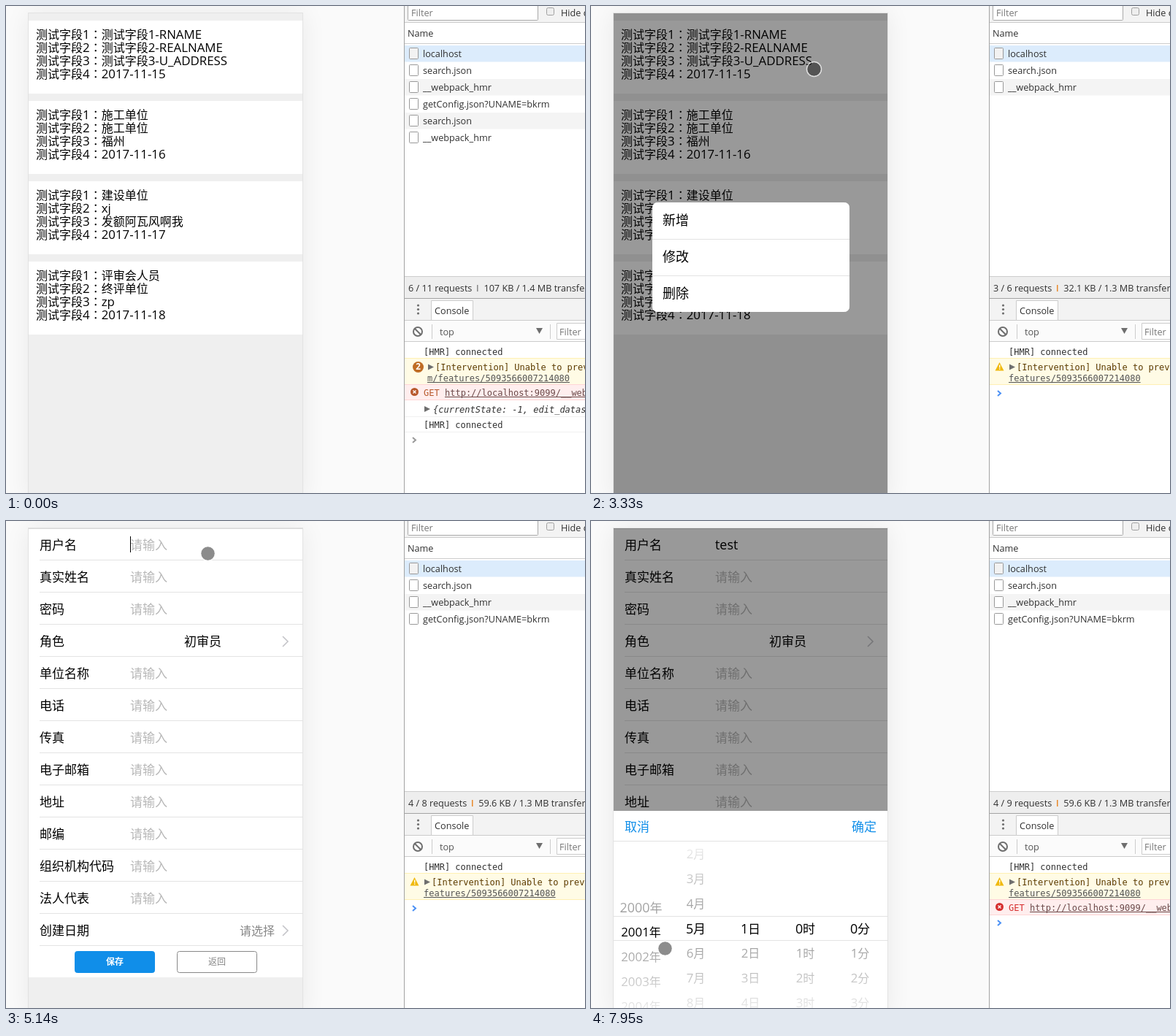
These frames come from a looping animation (793x667 px, 8000 ms). An HTML page with a canvas:

```html
<!DOCTYPE html>
<html lang="zh">
<head>
<meta charset="utf-8">
<style>
  html, body { margin: 0; width: 100%; height: 100%; overflow: hidden; background: #fafafa; }
  canvas { display: block; }
</style>
</head>
<body>
<canvas id="stage" width="793" height="667"></canvas>
<script>
const LOOP = 8000;
const PHONE = { x: 31, y: 10, w: 375, h: 667 };
const BLUE = '#108ee9', LINE = '#e3e3e3', INK = '#303030';
const ctx = document.getElementById('stage').getContext('2d');

const CARDS = [
  ['测试字段1-RNAME', '测试字段2-REALNAME', '测试字段3-U_ADDRESS', '2017-11-15'],
  ['施工单位', '施工单位', '福州', '2017-11-16'],
  ['建设单位', 'xj', '发额阿瓦风啊我', '2017-11-17'],
  ['评审会人员', '终评单位', 'zp', '2017-11-18'],
];
const FIELDS = ['用户名', '真实姓名', '密码', '角色', '单位名称', '电话', '传真', '电子邮箱',
  '地址', '邮编', '组织机构代码', '法人代表', '创建日期'];
const REQUESTS = ['localhost', 'search.json', '__webpack_hmr', 'getConfig.json?UNAME=bkrm',
  'search.json', '__webpack_hmr'];
// time, x, y
const POINTER = [
  [1760, 394, 150], [2220, 305, 86], [3540, 305, 86], [3850, 258, 295], [4000, 258, 295],
  [4330, 262, 228], [4760, 266, 110], [5080, 276, 44], [5460, 276, 44], [6230, 250, 564],
  [6560, 250, 564], [7200, 158, 640], [7240, 158, 640], [7480, 158, 560], [7630, 158, 560],
  [7800, 101, 614], [7950, 101, 585],
];
const MONTH_SCROLL = [[7240, 0], [7480, 2.6], [7560, 3.5], [7700, 4]];
const YEAR_SCROLL = [[7800, 0], [7950, 0.85]];

const progress = (t, from, to) => Math.min(1, Math.max(0, (t - from) / (to - from)));
const easeOut = p => 1 - (1 - p) ** 3;
// Latest value of a [time, value] list
const stepAt = (t, steps) => steps.filter(s => s[0] <= t).pop()[1];

function along(t, keys) {
  const i = keys.findIndex(k => k[0] > t);
  if (i === 0) return keys[0].slice(1);
  if (i < 0) return keys[keys.length - 1].slice(1);
  const p = progress(t, keys[i - 1][0], keys[i][0]);
  return keys[i - 1].slice(1).map((v, n) => v + (keys[i][n + 1] - v) * p);
}

function rect(x, y, w, h, color) {
  ctx.fillStyle = color;
  ctx.fillRect(x, y, w, h);
}

function box(x, y, w, h, fill, stroke, radius = 0) {
  ctx.beginPath();
  ctx.roundRect(x + 0.5, y + 0.5, w - 1, h - 1, radius);
  ctx.fillStyle = fill;
  ctx.fill();
  ctx.lineWidth = 1;
  ctx.strokeStyle = stroke || fill;
  ctx.stroke();
}

function disc(x, y, r, color) {
  ctx.beginPath();
  ctx.arc(x, y, r, 0, 7);
  ctx.fillStyle = color;
  ctx.fill();
}

function poly(points, color) {
  ctx.beginPath();
  points.forEach(p => ctx.lineTo(...p));
  ctx.fillStyle = color;
  ctx.fill();
}

function stroke(points, color, width = 1.5) {
  ctx.beginPath();
  points.forEach(p => ctx.lineTo(...p));
  ctx.strokeStyle = color;
  ctx.lineWidth = width;
  ctx.stroke();
}

function runFont(run, size, bold) {
  if (run === '：') return `300 ${size}px "Noto Sans CJK JP", "Noto Sans CJK", sans-serif`;
  if (/[ -~]/.test(run)) return `${bold ? 700 : 400} ${size * 1.055}px "Open Sans", sans-serif`;
  return `${bold ? 700 : 300} ${size}px "Noto Sans CJK SC", "Noto Sans CJK", sans-serif`;
}

// Mixed Chinese and Latin text, centred vertically on y; returns its right end
function text(s, x, y, size = 16, color = '#000', align = 0, bold = false) {
  const runs = s.match(/[\u4e00-\u9fff]+|：|[ -~]+/g).map(run => {
    const font = runFont(run, size, bold);
    ctx.font = font;
    return { run, font, width: ctx.measureText(run).width };
  });
  x -= align * runs.reduce((sum, r) => sum + r.width, 0);
  ctx.fillStyle = color;
  for (const { run, font, width } of runs) {
    ctx.font = font;
    ctx.fillText(run, x, y + size * 0.36);
    x += width;
  }
  return x;
}

const label = (s, x, y, color = INK) => text(s, x, y, 12, color);

function mono(s, x, y, color = INK, { italic, underline } = {}) {
  ctx.font = `${italic ? 'italic ' : ''}12px "DejaVu Sans Mono", monospace`;
  ctx.fillStyle = color;
  ctx.fillText(s, x, y + 4);
  if (underline) rect(x, y + 5, ctx.measureText(s).width, 1, color);
}

// ---- Phone ----

function drawList() {
  CARDS.forEach((values, i) => {
    const y = 20 + i * 110;
    rect(31, y, 375, 100, '#fff');
    values.forEach((v, n) => text(`测试字段${n + 1}：${v}`, 41, y + 19.5 + n * 18));
  });
}

function chevron(x, y) {
  stroke([[x - 4, y - 7], [x + 3, y], [x - 4, y + 7]], '#c4c4c8', 1.6);
}

function drawForm(t) {
  const typed = stepAt(t, [[0, ''], [5230, 'te'], [5310, 'tes'], [5460, 'test']]);
  const rowColor = stepAt(t, [[0, '#fff'], [6310, '#ececec'], [6460, '#fbfbfb'], [6560, '#fff']]);
  rect(31, 10, 375, 615, '#fff');
  rect(31, 10, 375, 1, '#d9d9d9');
  rect(31, 538, 375, 44, rowColor);
  FIELDS.forEach((name, i) => {
    const y = 33 + i * 44;
    text(name, 46, y, 17);
    rect(46, y + 20, 360, 1, LINE);
    if (i === 3) {
      text('初审员', 244, y, 17);
      chevron(383, y);
    } else if (i === 12) {
      text('请选择', 320, y, 16, '#888');
      chevron(383, y);
    } else if (i || !typed) {
      text('请输入', 170, y, 17, '#b8b8b8');
    }
  });
  const end = typed ? text(typed, 170, 33, 17) : 170;
  if (t >= 5060 && t < 6310 && (t - 5060) % 1000 < 500) rect(Math.round(end), 21, 1, 22, '#000');
  if (typed && t < 6560) {
    disc(380, 32.5, 10.5, '#ccc');
    stroke([[375.5, 28], [384.5, 37]], '#fff');
    stroke([[384.5, 28], [375.5, 37]], '#fff');
  }
  box(94, 589, 110, 30, BLUE, BLUE, 3);
  text('保存', 149, 604, 12, '#fff', 0.5, true);
  box(234, 589, 110, 30, '#fff', '#888', 3);
  text('返回', 289, 604, 12, '#888', 0.5);
}

function shade(alpha) {
  rect(31, 10, 375, 667, `rgba(0,0,0,${alpha})`);
}

function drawMenu(t) {
  if (t < 3180 || t > 4380) return;
  shade(0.4 * progress(t, 3110, 3330) * (1 - progress(t, 4070, 4380)));
  ctx.save();
  ctx.globalAlpha = progress(t, 3110, 3330) * (1 - progress(t, 4070, 4230));
  box(84, 269, 270, 150, '#fff', '#fff', 6);
  ['新增', '修改', '删除'].forEach((s, i) => {
    text(s, 98, 294 + i * 50, 18);
    if (i) rect(84, 269 + i * 50, 270, 1, LINE);
  });
  ctx.restore();
}

function drawWheel(column, unit, first, offset, selected) {
  for (let i = 0; i < 12; i++) {
    const y = 558.5 + (i - offset) * 34;
    if (y > 420 && y < 690) {
      text(first + i + unit, 68.5 + column * 75, y, i === selected ? 17 : 16, '#000', 0.5);
    }
  }
}

function drawMask(y, from, to) {
  const g = ctx.createLinearGradient(0, y, 0, y + 102);
  g.addColorStop(0, `rgba(255,255,255,${from})`);
  g.addColorStop(1, `rgba(255,255,255,${to})`);
  rect(31, y, 375, 102, g);
}

function drawPicker(t) {
  if (t < 6560) return;
  const p = easeOut(progress(t, 6530, 6860));
  shade(0.4 * p);
  ctx.save();
  ctx.translate(0, 280 * (1 - p));
  rect(31, 397, 375, 280, '#fff');
  ctx.beginPath();
  ctx.rect(31, 439, 375, 238);
  ctx.save();
  ctx.clip();
  drawWheel(0, '年', 2000, along(t, YEAR_SCROLL)[0], 0);
  drawWheel(1, '月', 1, along(t, MONTH_SCROLL)[0], t < 7700 ? 0 : 4);
  drawWheel(2, '日', 1, 0, 0);
  drawWheel(3, '时', 0, 0, 0);
  drawWheel(4, '分', 0, 0, 0);
  drawMask(439, 0.95, 0.6);
  drawMask(575, 0.6, 0.95);
  ctx.restore();
  for (const y of [438, 541, 574]) rect(31, y, 375, 1, LINE);
  text('取消', 46, 419, 17, BLUE);
  text('确定', 391, 419, 17, BLUE, 1);
  ctx.restore();
}

function drawPhone(t) {
  const { x, y, w, h } = PHONE;
  ctx.save();
  ctx.shadowColor = 'rgba(0,0,0,.07)';
  ctx.shadowBlur = 32;
  rect(x - 1, y - 1, w + 2, h + 2, '#e2e2e2');
  ctx.restore();
  ctx.save();
  ctx.beginPath();
  ctx.rect(x, y, w, h);
  ctx.clip();
  rect(x, y, w, h, '#efefef');
  const slide = Math.round(w * easeOut(progress(t, 4272, 4732)));
  if (slide < w && !(t >= 1010 && t < 1400)) {
    ctx.save();
    ctx.translate(-slide, 0);
    drawList();
    ctx.restore();
  }
  if (slide > 0) {
    ctx.save();
    ctx.translate(w - slide, 0);
    drawForm(t);
    ctx.restore();
  }
  drawMenu(t);
  drawPicker(t);
  ctx.restore();
}

function drawPointer(t) {
  if (t < 1760) return;
  const [x, y] = along(t, POINTER);
  disc(x + 0.5, y + 0.5, 9.5, 'rgba(0,0,0,.45)');
  ctx.beginPath();
  ctx.arc(x + 0.5, y + 0.5, 10, 0, 7);
  ctx.lineWidth = 1.5;
  ctx.strokeStyle = 'rgba(255,255,255,.7)';
  ctx.stroke();
}

// ---- Developer tools ----

function drawNetwork(t) {
  rect(546, 0, 247, 22, '#f3f3f3');
  rect(546, 22, 247, 1, '#ccc');
  box(550, -4, 179, 24, '#fff', '#a9a9a9', 1);
  label('Filter', 555, 9.5, '#777');
  box(740, 2, 11, 11, '#eee', '#a0a0a0', 2);
  label('Hide data URLs', 760, 9.5);
  if (t < 680 || t >= 760) label('Name', 550, 38);
  rect(546, 51, 247, 1, '#ccc');

  const rows = stepAt(t, [[0, 6], [680, 0], [760, 1], [1400, 2], [1550, 3], [4250, 4]]);
  REQUESTS.slice(0, rows).forEach((name, i) => {
    const y = 54 + i * 23;
    rect(546, y, 247, 22.5, i === 0 ? '#dcecfc' : i % 2 ? '#fff' : '#f4f4f4');
    box(552, y + 3, 13, 16, i === 0 ? '#f2f2f2' : '#fff', '#999', 1);
    label(name, 571, y + 11.5);
  });

  rect(546, 370, 247, 1, '#ccc');
  rect(546, 371, 247, 29, '#eee');
  const [count, size] = stepAt(t, [
    [0, ['6 / 11', '107 KB / 1.4 MB']], [680, []], [760, ['1 / 1', '0 B / 0 B']],
    [1400, ['3 / 6', '32.1 KB / 1.3 MB']], [4250, ['4 / 8', '59.6 KB / 1.3 MB']],
    [5310, ['4 / 9', '59.6 KB / 1.3 MB']],
  ]);
  if (!count) return;
  const end = label(`${count} requests`, 551, 386.5);
  rect(Math.round(end + 7), 382, 1.5, 9, t < 680 ? '#888' : '#e8892b');
  label(`${size} transferred`, end + 16, 386.5);
}

function drawToolbar() {
  rect(546, 400, 247, 1, '#a3a3a3');
  rect(546, 401, 247, 29, '#f3f3f3');
  rect(546, 430, 247, 1, '#ccc');
  rect(546, 431, 247, 28, '#fbfbfb');
  rect(546, 459, 247, 1, '#ccc');
  for (const y of [410, 415.5, 421]) disc(564.5, y, 1.6, '#6e6e6e');
  box(582, 403, 58, 28, '#fff', '#ccc');
  label('Console', 587, 417.5);
  ctx.beginPath();
  ctx.arc(564, 446, 6, 0, 7);
  ctx.lineWidth = 2;
  ctx.strokeStyle = '#6e6e6e';
  ctx.stroke();
  stroke([[560, 442], [568, 450]], '#6e6e6e', 2);
  rect(583, 436, 1, 20, '#ccc');
  rect(745, 436, 1, 20, '#ccc');
  label('top', 594, 446.5, '#555');
  poly([[726, 441], [735, 441], [730.5, 449]], '#6e6e6e');
  box(754, 434, 60, 23, '#fff', '#ccc');
  label('Filter', 758, 446.5, '#777');
}

function expander(x, y) {
  poly([[x, y - 4], [x + 8, y], [x, y + 4]], '#6e6e6e');
}

function band(y, h, fill, edge) {
  rect(546, y, 247, h, fill);
  rect(546, y, 247, 1, edge);
  rect(546, y + h - 1, 247, 1, edge);
}

function drawWarning(repeated) {
  const shift = repeated ? 5 : 0;
  band(482, 37, '#fffbe5', '#fff0b3');
  if (repeated) {
    disc(564.5, 494.5, 7.5, '#bf6c24');
    text('2', 564.5, 494.5, 11, '#fff', 0.5, true);
  } else {
    poly([[559.5, 488], [565.5, 499.5], [553.5, 499.5]], '#f0b90f');
    rect(559, 491.5, 1.4, 4, '#fff');
    rect(559, 496.5, 1.4, 1.4, '#fff');
  }
  expander(573 + shift, 494.5);
  mono('[Intervention] Unable to preventDefault', 583 + shift, 495, '#5c3b00');
  mono(`${repeated ? 'm/' : ''}features/5093566007214080`, 572 + shift, 510, '#545454', { underline: true });
}

function drawError(color) {
  band(518, 22, '#ffeeee', '#ffd6d6');
  disc(559.5, 528.5, 5.5, color);
  stroke([[557.5, 526.5], [561.5, 530.5]], '#fff', 1.3);
  stroke([[561.5, 526.5], [557.5, 530.5]], '#fff', 1.3);
  mono('GET', 572, 530, color);
  mono('http://localhost:9099/__webpack_hmr', 601, 530, '#6b4a4a', { underline: true });
}

function drawPrompt(y, color) {
  stroke([[557, y - 3.5], [561, y], [557, y + 3.5]], color, 2);
}

function drawConsole(t) {
  if (t < 680) {
    mono('[HMR] connected', 572, 474);
    drawWarning(true);
    drawError('#b8582c');
    expander(573, 552);
    mono('{currentState: -1, edit_datas: Array(0)}', 585, 553, INK, { italic: true });
    rect(546, 562, 247, 1, '#f0f0f0');
    mono('[HMR] connected', 572, 574);
    rect(546, 583, 247, 1, '#f0f0f0');
    drawPrompt(594.5, '#999');
    if (t >= 460) rect(572, 587, 1, 15, '#000');
    return;
  }
  if (t >= 1760) mono('[HMR] connected', 572, 474);
  if (t >= 2400) drawWarning(false);
  if (t >= 6900) drawError('#d62f2f');
  drawPrompt(stepAt(t, [[0, 474], [1760, 495], [2400, 530.5], [6900, 550.5]]), '#4a90f5');
}

function draw(t) {
  rect(0, 0, 793, 667, '#fafafa');
  drawPhone(t);
  rect(546, 0, 247, 667, '#fff');
  rect(545, 0, 1, 667, '#a3a3a3');
  drawNetwork(t);
  drawToolbar();
  drawConsole(t);
  drawPointer(t);
}

const start = performance.now();
function tick() {
  draw((performance.now() - start) % LOOP);
  requestAnimationFrame(tick);
}
tick();
</script>
</body>
</html>
```
